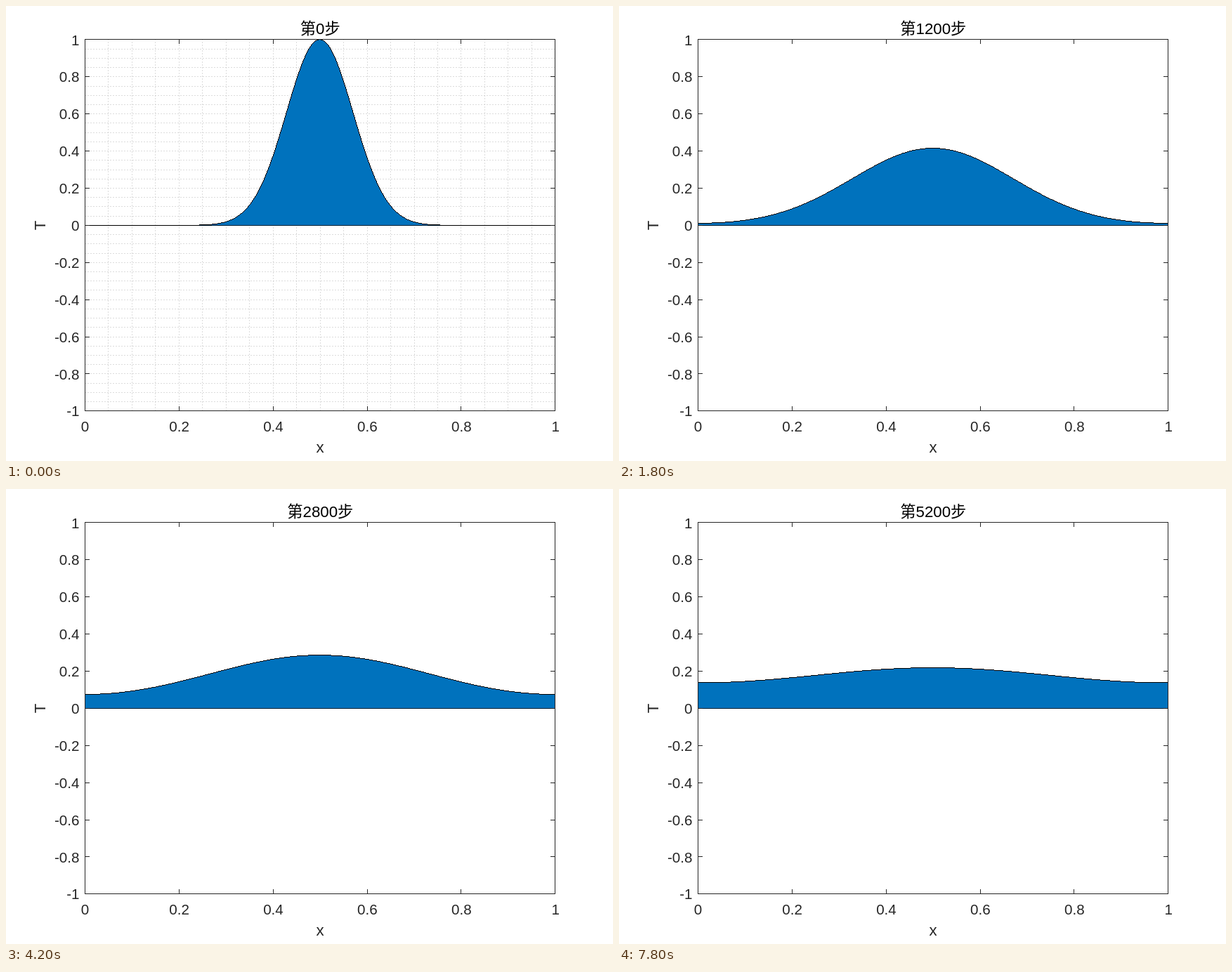
Animation, 864 px wide and 648 px high, one loop 8 s. Source, as an HTML page with a canvas:

```html
<!DOCTYPE html>
<html lang="zh-CN">
<head>
<meta charset="utf-8">
<title>Diffusion</title>
<style>
html, body { margin: 0; width: 100%; height: 100%; overflow: hidden; background: #fff; }
canvas { display: block; }
</style>
</head>
<body>
<canvas id="plot" width="864" height="648"></canvas>
<script>
const ctx = document.getElementById('plot').getContext('2d');

const LOOP = 8000, HOLD = 300, STEPS_PER_HOLD = 200;
const X0 = 112.3, WIDTH = 669.6;   // x = 0 and the length of one unit
const Y0 = 312.4, UNIT = 264.45;   // y = 0 and the height of one unit
const INK = '#262626';
const FONT = '"Liberation Sans", "Noto Sans CJK SC", "Noto Sans CJK", sans-serif';

const px = x => X0 + x * WIDTH;
const py = y => Y0 - y * UNIT;
const col = x => Math.floor(px(x));
const row = y => Math.floor(py(y));
const L = col(0), R = col(1), T = row(1), B = row(-1);

// Heat equation, insulated ends: a spreading Gaussian plus its mirror images.
function heat(x, step) {
  const spread = 0.005 + 2e-5 * step, period = 0.995;
  let sum = 0;
  for (let k = -2; k <= 2; k++) {
    sum += Math.exp(-((x - 0.5 - k * period) ** 2) / (2 * spread));
  }
  return Math.sqrt(0.005 / spread) * sum;
}

function box(color, x, y, w, h) {
  ctx.fillStyle = color;
  ctx.fillRect(x, y, w, h);
}

function line(x1, y1, x2, y2) {
  ctx.beginPath();
  ctx.moveTo(x1 + 0.5, y1 + 0.5);
  ctx.lineTo(x2 + 0.5, y2 + 0.5);
  ctx.stroke();
}

function text(str, x, y, size, align = 'center', color = INK) {
  ctx.font = `300 ${size}px ${FONT}`;
  ctx.textAlign = align;
  ctx.fillStyle = color;
  ctx.fillText(str, x, y);
}

function drawGrid() {
  ctx.strokeStyle = '#b8b8b8';
  ctx.setLineDash([1, 3]);
  for (let i = 1; i < 20; i++) line(col(i / 20), B, col(i / 20), T);
  for (let i = 1; i < 40; i++) line(L, row(1 - i / 20), R, row(1 - i / 20));
  ctx.setLineDash([]);
}

// Crisp one-pixel columns: fill, base line, then the outline.
function drawArea(step) {
  const zero = row(0);
  const top = i => row(heat((i + 0.5 - X0) / WIDTH, step));
  for (let i = L + 1; i < R; i++) {
    const y = top(i), next = top(i + 1);
    box('#0072bd', i, y, 1, zero - y);
    box('#001c2f', i, zero, 1, 1);
    box('#000', i, Math.min(y, next), 1, Math.max(1, Math.abs(next - y)));
  }
}

function drawAxes() {
  ctx.strokeStyle = INK;
  ctx.strokeRect(L + 0.5, T + 0.5, R - L, B - T);
  for (let i = 0; i <= 5; i++) {
    const x = col(i / 5);
    line(x, B, x, B - 6.5);
    line(x, T, x, T + 6.5);
    text(String(i / 5), px(i / 5) + 0.3, 605.5, 20.6);
  }
  for (let i = -5; i <= 5; i++) {
    const y = row(i / 5);
    line(L, y, L + 6.5, y);
    line(R, y, R - 6.5, y);
    text(String(i / 5), 104.5, py(i / 5) + 7.6, 20.6, 'right');
  }
  text('x', 447, 636, 22.3);
  ctx.save();
  ctx.translate(56, 312.4);
  ctx.rotate(-Math.PI / 2);
  text('T', 0, 0, 22.3);
  ctx.restore();
}

function draw(step) {
  box('#fff', 0, 0, 864, 648);
  ctx.lineWidth = 1;
  if (step === 0) drawGrid();
  drawArea(step);
  drawAxes();
  text(`第${step}步`, 447.3, 39.6, 22.3, 'center', '#000');
}

const start = performance.now();
let shown = -1;

function tick() {
  const t = (performance.now() - start) % LOOP;
  const step = Math.floor(t / HOLD) * STEPS_PER_HOLD;
  if (step !== shown) {
    shown = step;
    draw(step);
  }
  requestAnimationFrame(tick);
}
tick();
</script>
</body>
</html>
```
